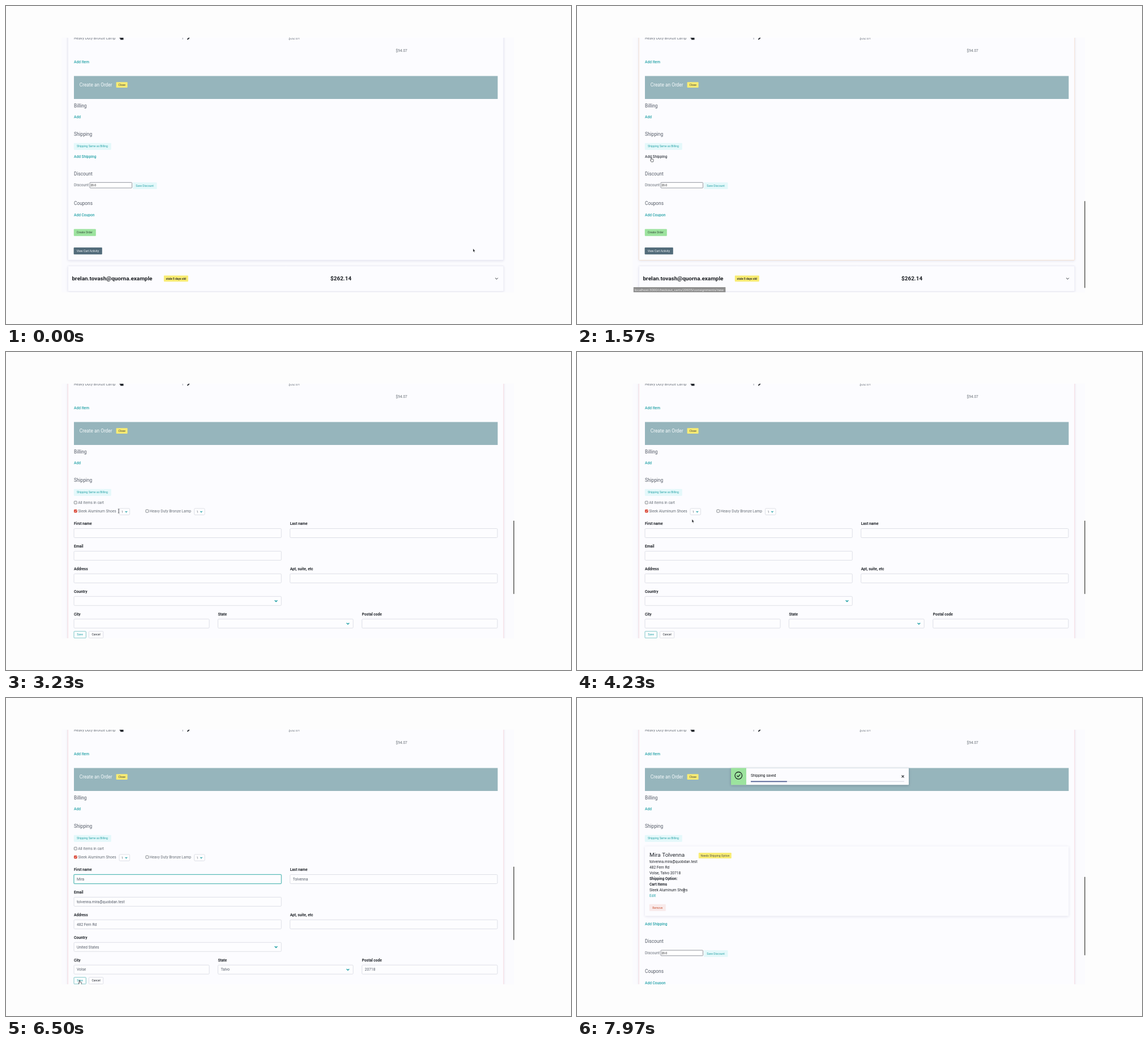
An HTML page with a canvas that plays this animation: 998x561 px, repeating every 8000 ms.

```html
<!DOCTYPE html>
<html lang="en">
<head>
<meta charset="utf-8">
<title>Cart checkout</title>
<style>
  html, body { margin: 0; width: 100%; height: 100%; overflow: hidden; background: #fdfdfd; }
  canvas { display: block; width: 100%; height: 100%; }
</style>
</head>
<body>
<canvas id="stage"></canvas>
<script>
const W = 998, H = 561, LOOP = 8000;
const canvas = document.getElementById('stage');
const ctx = canvas.getContext('2d');
const ratio = window.devicePixelRatio || 1;
canvas.width = W * ratio;
canvas.height = H * ratio;

const BODY = 6.62, HEAD = 8.3, SMALL = 5.03, LARGE = 9.96;
const TEAL = '#27a3a8', GREY = '#697078', DARK = '#23272d', INK = '#565d68';
const YELLOW = '#f8ec74', GREEN = '#9ce39e', PALE = '#e4f8fa', LINE = '#d6d9e0';

// Moments of the interaction, in ms
const HOVER = 350, LINK = 1430, FORM = 1850, CHECK = 2850;
const FOCUS = 4900, FILL = 5800, SAVED = 6556;

// Pointer path: time, x, y
const path = [
  [0, 825, 428], [300, 825, 428], [1450, 131.5, 267], [1780, 131.5, 267],
  [2050, 157.5, 302], [2300, 157.5, 302], [2700, 122.5, 280], [2950, 122.5, 280],
  [3220, 199, 280.5], [3900, 199, 280.5], [4700, 210, 319.5], [5350, 210, 319.5],
  [5650, 205, 337], [5850, 205, 337], [6350, 130, 498], [7400, 130, 498],
  [7850, 189, 339.5], [LOOP, 189, 339.5]
];

const clamp = v => Math.max(0, Math.min(1, v));
const ease = v => v * v * (3 - 2 * v);

function pointerAt(t) {
  const i = Math.max(1, path.findIndex(p => p[0] > t));
  const [t0, x0, y0] = path[i - 1], [t1, x1, y1] = path[i];
  const k = ease(clamp((t - t0) / (t1 - t0)));
  return [x0 + (x1 - x0) * k, y0 + (y1 - y0) * k];
}

// y is the middle of the capital letters
function text(str, x, y, size = BODY, color = GREY, weight = 400, family = 'Roboto') {
  ctx.font = `${weight} ${size}px ${family}, sans-serif`;
  ctx.fillStyle = color;
  ctx.fillText(str, x, y + size * 0.356);
}

function box(x, y, w, h, fill, stroke, r = 1, line = 0.8) {
  ctx.beginPath();
  ctx.roundRect(x, y, w, h, r);
  if (fill) { ctx.fillStyle = fill; ctx.fill(); }
  if (stroke) { ctx.strokeStyle = stroke; ctx.lineWidth = line; ctx.stroke(); }
}

function stroke(points, color, width) {
  ctx.beginPath();
  points.forEach(([x, y]) => ctx.lineTo(x, y));
  ctx.strokeStyle = color;
  ctx.lineWidth = width;
  ctx.stroke();
}

function shape(points, x, y, fill, edge, width) {
  ctx.beginPath();
  points.forEach(([px, py]) => ctx.lineTo(x + px, y + py));
  ctx.closePath();
  ctx.fillStyle = fill;
  ctx.fill();
  ctx.strokeStyle = edge;
  ctx.lineWidth = width;
  ctx.stroke();
}

function panel(x, y, w, h, edge, glow = 'rgba(60,60,110,.14)') {
  ctx.save();
  ctx.shadowColor = glow;
  ctx.shadowBlur = 4 * ratio;
  ctx.shadowOffsetY = 1 * ratio;
  box(x, y, w, h, '#fcfcff', null, 1);
  ctx.restore();
  if (edge) box(x, y, w, h, null, edge, 1, 0.9);
}

function button(label, x, y, w, h, fill, color, pad = 5, edge = null, weight = 400) {
  box(x, y, w, h, fill, edge);
  text(label, x + pad, y + h / 2, SMALL, color, weight);
}

function chevron(x, y, s, color, width = 1.3) {
  stroke([[x - s, y - s / 2], [x, y + s / 2], [x + s, y - s / 2]], color, width);
}

function checkbox(x, y, on) {
  box(x + 0.4, y + 0.4, 4.8, 4.8, on ? '#d9402f' : '#fff', on ? '#d9402f' : '#666b72', 0.8, 0.8);
  if (on) stroke([[x + 1.3, y + 2.9], [x + 2.4, y + 4], [x + 4.4, y + 1.5]], '#fff', 0.9);
}

function quantity(x) {
  box(x, 276, 18.5, 11.3, '#fdfdff', LINE, 1.5);
  text('1', x + 4, 281.8, 5.4, INK);
  chevron(x + 12.4, 281.7, 1.7, TEAL, 1.2);
}

function field(label, x, y, w, value, options = {}) {
  text(label, x, y - 8.9, BODY, DARK, 600);
  if (options.focus) box(x, y, w, 16, null, 'rgba(90,195,190,.25)', 1.5, 2.4);
  box(x, y, w, 16, '#fdfdff', options.focus ? '#55b8b4' : LINE, 1.5, options.focus ? 1.1 : 0.8);
  if (options.select) chevron(x + w - 9.3, y + 8, 2.3, TEAL, 1.5);
  if (value) text(value, x + 5, y + 8, BODY, INK);
}

function header() {
  text('Heavy Duty Bronze Lamp', 120, 56.8);
  text('1', 310, 56.8);
  text('$52.01', 499, 56.8);
  ctx.fillStyle = DARK;
  ctx.fillRect(202, 54, 5.5, 5.6);
  ctx.fillRect(200.6, 55, 2, 2.4);
  stroke([[320.4, 59.2], [324.4, 55]], DARK, 1.9);
  text('$94.07', 688.5, 78.2);
  text('Add Item', 120, 98.4, BODY, TEAL, 500);
  box(120, 123.6, 748.5, 40.4, '#96b5bc', null, 0);
  text('Create an Order', 129.8, 138.7, HEAD, '#f6fafb');
  button('Close', 194.6, 134.2, 20, 9.8, YELLOW, '#43453a', 3.8);
  text('Billing', 120, 175.8, HEAD, INK);
  text('Add', 120, 196, BODY, TEAL, 500);
  text('Shipping', 120, 226.2, HEAD, INK);
  button('Shipping Same as Billing', 119.8, 241.7, 66, 12, PALE, TEAL, 5.2);
}

function footer(dy, linkColor = TEAL) {
  ctx.save();
  ctx.translate(0, dy);
  text('Add Shipping', 120, 265.4, BODY, linkColor, 500);
  text('Discount', 120, 295.6, HEAD, INK);
  text('Discount', 120, 315.8);
  box(148, 311.3, 74.5, 9.7, '#fff', '#777b84', 1, 0.8);
  text('20.0', 149.3, 316.4, SMALL, '#15171a');
  button('Save Discount', 224, 311.2, 42.5, 11.8, PALE, TEAL, 5.2);
  text('Coupons', 120, 348.5, HEAD, INK);
  text('Add Coupon', 120, 368.6, BODY, TEAL, 500);
  button('Create Order', 119.8, 393.6, 39, 12.2, GREEN, '#37503d', 5);
  button('View Cart Activity', 119.6, 426, 50.2, 12.2, '#536c7b', '#f2f6f8', 5.2);
  ctx.restore();
}

function nextCart() {
  panel(109.5, 458.5, 769.5, 44.7, '#ececf5');
  text('brelan.tovash@quorna.example', 116.5, 480.9, LARGE, '#1b1e23', 700);
  button('stale 5 days old', 278.8, 475.6, 43, 10.6, YELLOW, '#35362c', 3.8, null, 600);
  text('$262.14', 573, 480.9, LARGE, '#1b1e23', 700);
  chevron(866.5, 480.9, 2.3, DARK, 1);
}

function form(t) {
  const full = t >= FILL, val = s => full ? s : '';
  checkbox(120, 262.8, false);
  text('All items in cart', 127.2, 265.4);
  checkbox(120, 277.8, t >= CHECK);
  text('Sleek Aluminum Shoes', 127.2, 280.6);
  quantity(200);
  checkbox(246.5, 277.8, false);
  text('Heavy Duty Bronze Lamp', 253.6, 280.6);
  quantity(332.5);
  field('First name', 120, 311.5, 366.3, val('Mira'), { focus: t >= FOCUS });
  field('Last name', 501.7, 311.5, 366.3, val('Tolvenna'));
  field('Email', 120, 351.4, 366.3, val('tolvenna.mira@quobdan.test'));
  field('Address', 120, 391.3, 366.3, val('482 Fern Rd'));
  field('Apt, suite, etc', 501.7, 391.3, 366.3);
  field('Country', 120, 431.2, 366.3, val('United States'), { select: true });
  field('City', 120, 471.1, 239, val('Volse'));
  field('State', 374.4, 471.1, 238.8, val('Talvo'), { select: true });
  field('Postal code', 628.8, 471.1, 239.2, val('20718'));
  button('Save', 120, 492.8, 21.3, 11.8, '#fcfeff', TEAL, 5.2, '#62b9b9');
  button('Cancel', 146.4, 492.8, 25.3, 11.8, '#fdfdff', DARK, 5, LINE);
  if (t >= FOCUS && !full && Math.floor((t - FOCUS) / 500) % 2 === 0)
    stroke([[125, 316], [125, 323.2]], DARK, 0.7);
}

function savedCard() {
  panel(120, 261.5, 748.5, 123);
  text('Mira Tolvenna', 128, 276.3, LARGE, DARK);
  button('Needs Shipping Option', 214.8, 273, 58, 10, YELLOW, '#55564a', 3.8);
  const rows = [
    ['tolvenna.mira@quobdan.test'], ['482 Fern Rd'], ['Volse, Talvo 20718'],
    ['Shipping Option:', 700], ['Cart Items', 700], ['Sleek Aluminum Shoes']
  ];
  rows.forEach(([label, weight], i) => text(label, 128, 288.7 + i * 9.95, BODY, DARK, weight));
  text('Edit', 128, 348.5, BODY, TEAL);
  button('Remove', 127.8, 363.8, 29, 12, '#f8eaea', '#c9502f', 5.4);
}

function toast(t) {
  panel(272, 123.6, 314, 29.6, null, 'rgba(30,40,60,.3)');
  box(272, 123.6, 27, 29.6, GREEN, null, 0);
  ctx.beginPath();
  ctx.arc(285.3, 136.8, 6.3, 0, 7);
  ctx.strokeStyle = '#1d2a24';
  ctx.lineWidth = 1.3;
  ctx.stroke();
  stroke([[282.4, 136.9], [284.5, 139], [288.4, 134.9]], '#1d2a24', 1.3);
  text('Shipping saved', 307, 136.9, BODY, '#111418');
  stroke([[573.5, 136.4], [577.5, 140.4]], DARK, 1.1);
  stroke([[577.5, 136.4], [573.5, 140.4]], DARK, 1.1);
  box(307, 146.6, 271, 1.5, '#e0e2ea', null, 0);
  box(307, 146.4, 271 * clamp((t - SAVED) / 6000), 1.9, '#505f92', null, 0);
}

function scrollbar(t) {
  if (t < HOVER) return;
  const [top, bottom] = t < FORM ? [344, 497.5] : t < SAVED ? [297.5, 427] : [315.5, 454];
  box(896.2, top, 1.6, bottom - top, '#62625f', null, 0.8);
}

function statusBar(t) {
  if (t < LINK) return;
  const alpha = 1 - clamp((t - 1960) / 220);
  if (!alpha) return;
  ctx.save();
  ctx.globalAlpha = alpha;
  box(99.8, 496, 162.6, 9, '#8f8f8f', null, 0.5);
  text('localhost:3000/checkout_carts/29935/consignments/new', 101.6, 500.4, 5.9, '#f1f1f1', 400, "'Noto Sans'");
  ctx.restore();
}

const arrow = [[0, 0], [0, 5.8], [1.3, 4.7], [2.2, 6.8], [3, 6.4], [2.1, 4.4], [3.8, 4.2]];
const hand = [[-0.7, 0], [0.4, 0], [0.5, 3], [3.3, 3.6], [3.7, 4.3], [3, 8], [-0.4, 8], [-2, 5], [-1.6, 4.4], [-0.7, 5.2]];

function pointer(t) {
  if (t > SAVED && t < 7450) return;
  const [x, y] = pointerAt(t);
  const overLink = t > LINK && t < FORM;
  const overButton = t > 6300 && t < SAVED;
  const overText = (t > 3080 && t < 4150) || (t > 4500 && t < 5600) || t > 7750;
  if (overLink || overButton) {
    shape(hand, x, y, '#fff', '#30343a', 0.7);
  } else if (overText) {
    stroke([[x, y - 3.4], [x, y + 3.4]], '#30343a', 0.8);
    stroke([[x - 1.3, y - 3.5], [x + 1.3, y - 3.5]], '#30343a', 0.6);
    stroke([[x - 1.3, y + 3.5], [x + 1.3, y + 3.5]], '#30343a', 0.6);
  } else {
    shape(arrow, x, y, '#22252a', '#fff', 0.35);
  }
}

function draw(t) {
  ctx.setTransform(ratio, 0, 0, ratio, 0, 0);
  ctx.fillStyle = '#fdfdfd';
  ctx.fillRect(0, 0, W, H);
  ctx.save();
  ctx.beginPath();
  ctx.rect(98.5, 56, 800, 449);
  ctx.clip();
  ctx.fillStyle = '#fbfbfe';
  ctx.fillRect(98.5, 56, 798.5, 449);

  const edge = t < HOVER ? '#e9e9f4' : t < FORM ? '#f5e0d0' : '#fad9dd';
  panel(109.3, 40, 769.6, t < FORM ? 408.4 : 500, edge);
  header();
  if (t < FORM) {
    footer(0, t >= LINK ? '#41464e' : TEAL);
    nextCart();
  } else if (t < SAVED) {
    form(t);
  } else {
    savedCard();
    footer(133.7);
    toast(t);
  }
  statusBar(t);
  scrollbar(t);
  pointer(t);
  ctx.restore();
}

const start = performance.now();
function tick() {
  draw((performance.now() - start) % LOOP);
  requestAnimationFrame(tick);
}
tick();
</script>
</body>
</html>
```
